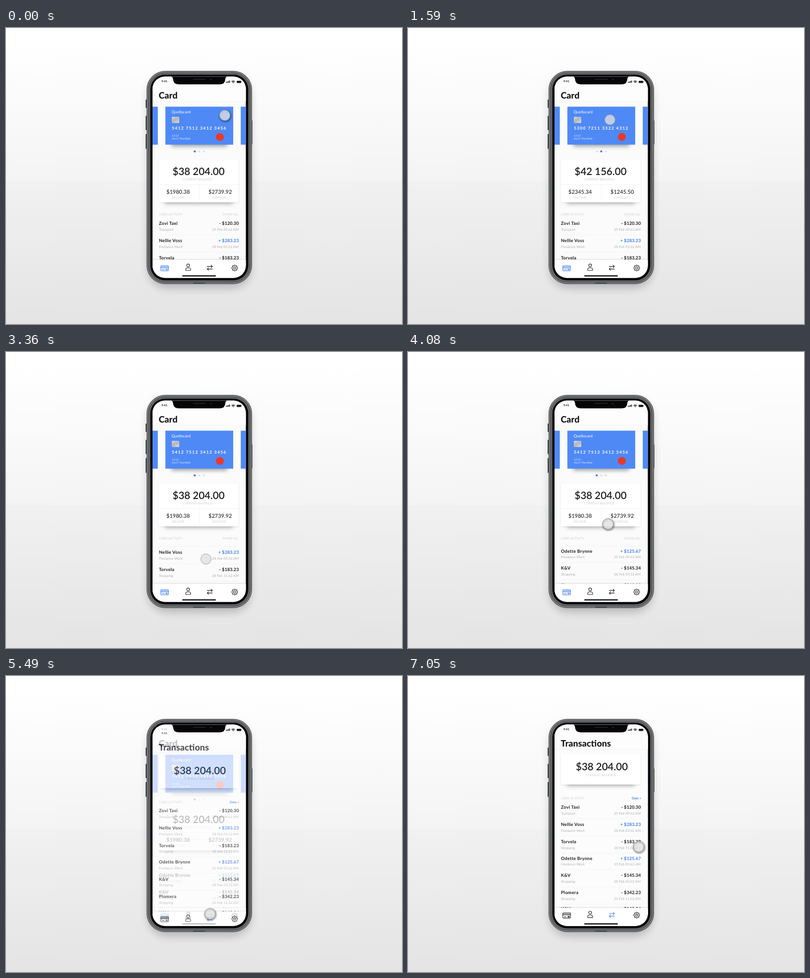
Write an HTML page that moves like this. It is 800 px wide and 600 px high and loops after 7080 ms.

```html
<!DOCTYPE html>
<html lang="en">
<head>
<meta charset="utf-8">
<title>Card app</title>
<style>
html, body { margin: 0; width: 100%; height: 100%; overflow: hidden; background: #fff; }
svg { display: block; width: 800px; height: 600px; font-family: Lato, "Open Sans", sans-serif; text-rendering: geometricPrecision; }
.title { font-size: 18px; font-weight: 800; fill: #151518; }
.sum { font-size: 20.5px; font-weight: 600; fill: #1c1c1f; }
.part { font-size: 11px; font-weight: 500; fill: #242428; }
.label { font-size: 6.5px; fill: #cfcfd2; }
.name { font-size: 9px; font-weight: 700; letter-spacing: .3px; fill: #1c1c1f; }
.amount { font-size: 9px; font-weight: 700; letter-spacing: .1px; fill: #1c1c1f; }
.plus { fill: #3f7cf0; }
.note { font-size: 7px; fill: #b1b1b5; }
.clock { font-size: 6px; font-weight: 700; fill: #222; }
.rule { stroke: #f3f3f5; stroke-width: 1; }
.icon { fill: none; stroke: #242428; stroke-width: 1.1; stroke-linecap: round; stroke-linejoin: round; }
.icon .on { stroke: #4c87f4; }
</style>
</head>
<body>
<svg id="stage" viewBox="0 0 800 600">
  <defs>
    <linearGradient id="wall" x2="0" y2="1"><stop offset=".08" stop-color="#fff"/><stop offset="1" stop-color="#f4f4f4"/></linearGradient>
    <linearGradient id="floor" x2="0" y2="1"><stop stop-color="#f1f1f1"/><stop offset="1" stop-color="#e4e4e4"/></linearGradient>
    <linearGradient id="chip" x2="1" y2="1"><stop stop-color="#d9d9d9"/><stop offset=".5" stop-color="#b9bbbd"/><stop offset="1" stop-color="#e6e6e6"/></linearGradient>
    <filter id="soft" x="-30%" y="-150%" width="160%" height="400%"><feGaussianBlur stdDeviation="4.5"/></filter>
    <filter id="wide" x="-30%" y="-30%" width="160%" height="160%"><feGaussianBlur stdDeviation="9"/></filter>
    <filter id="thin" x="-30%" y="-50%" width="160%" height="200%"><feGaussianBlur stdDeviation="1.6"/></filter>
    <clipPath id="screenClip"><rect x="296" y="98.5" width="188.5" height="408" rx="25"/></clipPath>
    <clipPath id="listClip"><rect x="296" y="389" width="189" height="81"/></clipPath>
    <clipPath id="pageClip"><rect x="296" y="255" width="189" height="215"/></clipPath>
  </defs>
  <rect width="800" height="310" fill="url(#wall)"/>
  <rect y="310" width="800" height="290" fill="url(#floor)"/>
  <rect x="287" y="97" width="207" height="430" rx="38" fill="#000" opacity=".22" filter="url(#wide)"/>
  <g fill="#4b4d4f">
    <rect x="282" y="145" width="4" height="17" rx="1"/>
    <rect x="282" y="178" width="4" height="29" rx="1"/>
    <rect x="282" y="215" width="4" height="30" rx="1"/>
    <rect x="495" y="187" width="2.800" height="49" rx="1"/>
  </g>
  <g id="frame">
    <rect x="284.500" y="87.500" width="212" height="431" rx="37" fill="#7a7c7e" stroke="#47494b"/>
    <rect x="288" y="91" width="205" height="424" rx="33.500" fill="#66686a" stroke="#3c3e40"/>
    <rect x="291.500" y="94.500" width="198" height="417" rx="30" fill="#060607"/>
  </g>
  <path d="M378 517.200h24" stroke="#47494b" stroke-width="1.500"/>
  <g clip-path="url(#screenClip)">
    <g id="cardPage"></g>
    <g id="listPage"></g>
    <path d="M332 97Q337 99 337.500 104Q338 114.200 349 114.200H432Q442.500 114.200 443 104Q443.500 99 448.500 97Z" fill="#060607"/>
    <g fill="#17171a">
      <path d="M444 111v-1.700h1.500v1.700zM446.300 111v-2.500h1.500v2.500zM448.600 111v-3.400h1.500v3.400zM450.900 111v-4.400h1.500v4.400z"/>
      <rect x="466" y="107" width="9" height="4.400" rx="1.200"/><rect x="475.600" y="108.300" width=".8" height="1.800"/>
    </g>
    <path d="M455.500 108.500q3.500-2.800 7 0M456.900 110q2.100-1.700 4.200 0" fill="none" stroke="#17171a" stroke-width="1.100"/>
    <circle cx="459" cy="111.200" r=".8" fill="#17171a"/>
  </g>
  <path d="M378 104h25" stroke="#3a3a3d" stroke-width="2.200" stroke-dasharray="1.300 1.300"/>
  <circle cx="414" cy="104.500" r="1.500" fill="#2c2d33"/>
  <g id="cursor">
    <circle id="cursorShade" cx="1" cy="1.500" r="10.800" fill="none" stroke="#000" stroke-width="2.500" filter="url(#thin)"/>
    <circle r="10.700" fill="#e0e0e0" fill-opacity=".78" stroke="#9a9c9f" stroke-width="1"/>
  </g>
</svg>
<script>
const LOOP = 7080;
const $ = id => document.getElementById(id);

const text = (x, y, cls, str, extra = '') => `<text x="${x}" y="${y}" class="${cls}" ${extra}>${str}</text>`;
const END = 'text-anchor="end"';
const MID = 'text-anchor="middle"';
const rule = (x1, y1, x2, y2) => `<path class="rule" d="M${x1} ${y1}L${x2} ${y2}"/>`;

const rows = [
  ['Zovi Taxi', 'Transport', '- $120.30', '29 Feb 09:62 AM'],
  ['Nellie Voss', 'Freelance Work', '+ $283.23', '28 Feb 03:32 AM'],
  ['Torvela', 'Shopping', '- $183.23', '28 Feb 11:32 AM'],
  ['Odette Brynne', 'Freelance Work', '+ $125.67', '25 Feb 09:62 AM'],
  ['K&amp;V', 'Shopping', '- $145.34', '28 Feb 03:32 AM'],
  ['Plomera', 'Shopping', '- $342.23', '24 Feb 11:32 AM'],
  ['K&amp;V', 'Shopping', '- $145.34', '28 Feb 03:32 AM']
];
const rowTops = [0, 35, 70.3, 103.8, 138.3, 173.5, 206.3];

const list = top => rows.map(([name, kind, amount, date], i) => {
  const y = top + rowTops[i];
  const tone = amount[0] === '+' ? 'amount plus' : 'amount';
  return text(309, y + 3.2, 'name', name) + text(470.5, y + 3.2, tone, amount, END) +
    text(309, y + 15, 'note', kind) + text(470, y + 15, 'note', date, END) +
    rule(309, y + 23.5, 470, y + 23.5);
}).join('');

const panel = (y, h) =>
  `<rect x="321" y="${y + h - 10}" width="137" height="13" fill="#000" opacity=".28" filter="url(#soft)"/>
   <rect x="309" y="${y + 1}" width="161" height="${h}" fill="#000" opacity=".1" filter="url(#thin)"/>
   <rect x="309" y="${y}" width="161" height="${h}" fill="#fff"/>`;

const bankCard = (x, digits) => `<g transform="translate(${x})">
  <rect x="334" y="226" width="113" height="14" fill="#000" opacity=".36" filter="url(#soft)"/>
  <rect x="322" y="159.500" width="137" height="77" fill="#4f89f6"/>
  <g fill="#fff">
    ${text(334.5, 173, '', 'Quellocard', 'font-size="8"')}
    ${text(335, 206, '', digits, 'font-size="8.5" font-weight="700" letter-spacing="1.35"')}
    ${text(335, 219.5, '', '12/23', 'font-size="5" opacity=".85"')}
    ${text(335, 226, '', 'Ana P. Thornfield', 'font-size="5" opacity=".9"')}
  </g>
  <rect x="335" y="180" width="15" height="12.500" rx="1.500" fill="url(#chip)"/>
  <path d="M335 184.500h5v4h-5M350 184.500h-5v4h5M342.500 180v4" fill="none" stroke="#96989a" stroke-width=".5"/>
  <circle cx="432" cy="220.800" r="8" fill="#e8392b"/>
</g>`;

const gear = () => {
  let d = '';
  for (let i = 0; i < 32; i++) {
    const a = (i - .5) * Math.PI / 16, r = i % 4 < 2 ? 6 : 4.8;
    d += `${i ? 'L' : 'M'}${(462 + r * Math.cos(a)).toFixed(2)} ${(486.5 + r * Math.sin(a)).toFixed(2)}`;
  }
  return `<path d="${d}Z"/><circle cx="462" cy="486.500" r="2.200"/>`;
};

const tabs = (active, shift) => {
  const on = name => name === active ? 'class="on"' : '';
  return `<rect x="296" y="469" width="189" height="5" fill="#000" opacity=".13" filter="url(#thin)"/>
    <rect x="296" y="470" width="189" height="60" fill="#fff"/>
    <g class="icon" transform="translate(0 ${shift})">
      <g ${on('card')}>
        <rect x="312.700" y="481.700" width="15.600" height="10.600" rx="1.300" fill="${active === 'card' ? '#ecf2ff' : 'none'}"/>
        <path d="M313 484h15M313 486h15M315.500 489.700h4"/><path d="M323 488.800h3v1.500h-3z"/>
      </g>
      <circle cx="368" cy="481.300" r="2.900"/>
      <path d="M363 491.300V489.500Q363 486.200 366.500 486.200H369.500Q373 486.200 373 489.500V491.300Z"/>
      <path ${on('swap')} d="M406.500 483.400H417M414.300 480.700L417 483.400L414.300 486.100M417 488.600H406.500M409.200 485.900L406.500 488.600L409.200 491.300"/>
      ${gear()}
    </g>
    <rect x="356" y="501.200" width="68" height="2.500" rx="1.250" fill="#111"/>`;
};

const header = title => `
  <rect x="296" y="90" width="189" height="58" fill="#fdfdfe"/>${rule(296, 148.5, 485, 148.5)}
  ${text(314, 110.2, 'clock', '9:41')}${text(308.5, 143.2, 'title', title)}`;

const figures = (id, sum, income, expense) => `<g id="${id}">
  ${text(336.5, 297.5, 'sum', sum)}${text(324, 335.7, 'part', income)}${text(409, 335.7, 'part', expense)}</g>`;

const NUMBER_A = '5412 7512 3412 3456', NUMBER_B = '5300 7211 3322 4312';

$('cardPage').innerHTML = `
  <rect x="296" y="90" width="189" height="420" fill="#fbfbfc"/>${header('Card')}
  <g id="cards">${[-1, 0, 1, 2].map(i => bankCard(i * 152.3, i % 2 ? NUMBER_B : NUMBER_A)).join('')}</g>
  ${[0, 1, 2].map(i => `<circle cx="${381.3 + i * 9.1}" cy="250.200" r="2.100" fill="#e0e1e4"/>`).join('')}
  <circle id="dotA" cx="381.300" cy="250.200" r="2.100" fill="#3f7cf0"/>
  <circle id="dotB" cx="390.400" cy="250.200" r="2.100" fill="#3f7cf0"/>
  ${panel(267.5, 86)}${rule(309, 317.5, 470, 317.5)}${rule(390.5, 318, 390.5, 353)}
  ${figures('sumsA', '$38 204.00', '$1980.38', '$2739.92')}
  ${figures('sumsB', '$42 156.00', '$2345.34', '$1245.50')}
  ${text(386.5, 308.8, 'label', 'CURRENT BALANCE', MID)}
  ${text(347.5, 346.2, 'label', 'INCOME', MID)}${text(431, 346.2, 'label', 'EXPENSE', MID)}
  ${text(309, 380.2, 'label', 'CARD ACTIVITY')}${text(470, 380.2, 'label', 'SHOW ALL', END)}
  <g clip-path="url(#listClip)"><g id="activity">${list(395.5)}</g></g>
  ${tabs('card', 0)}`;

$('listPage').innerHTML = `
  <rect x="296" y="70" width="189" height="460" fill="#fcfcfd"/>${header('Transactions')}
  ${panel(158, 62)}${text(339, 191, 'sum', '$38 204.00')}${text(390, 202.8, 'label', 'CURRENT BALANCE', MID)}
  ${text(309, 250.2, 'label', 'CARD ACTIVITY')}
  ${text(466, 250.2, 'label', 'Date', END + ' font-weight="700" style="fill:#3f7cf0"')}
  <path d="M467.700 247.300h3l-1.500 2z" fill="#3f7cf0"/>
  <g clip-path="url(#pageClip)">${list(265.5)}</g>
  ${tabs('swap', -1.7)}`;

const clamp = v => Math.min(1, Math.max(0, v));
const inOut = p => p < .5 ? 4 * p ** 3 : 1 - 4 * (1 - p) ** 3;

// Eased value between [time, value] stops.
function track(t, stops) {
  let [t0, v0] = stops[0];
  for (const [t1, v1] of stops) {
    if (t < t1) return v0 + (v1 - v0) * inOut(clamp((t - t0) / (t1 - t0)));
    [t0, v0] = [t1, v1];
  }
  return v0;
}

const cursorX = [[0, 442], [720, 444], [800, 444], [1400, 408], [1600, 408], [1760, 372], [2160, 409], [2340, 409], [2950, 404], [4200, 404], [5200, 412], [6510, 412], [7050, 466]];
const cursorY = [[0, 177], [720, 185], [1400, 186], [1600, 186], [2160, 185], [2340, 185], [2950, 444.5], [3060, 444.5], [3810, 348.5], [4200, 348.5], [5200, 482], [6510, 482], [7050, 346]];
const press = [[720, 0], [800, 1], [2350, 1], [2480, 0], [2960, 0], [3060, 1], [3810, 1], [3920, 0], [5180, 0], [5260, 1], [5360, 0]];
const swipe = [[800, 0], [1400, 1], [1760, 1], [2160, 0]];
const scroll = [[3060, 0], [3810, -96]];

function draw(t) {
  const s = track(t, swipe), swap = clamp(s * 3 - 1), p = track(t, press);
  $('cards').setAttribute('transform', `translate(${-152.3 * s})`);
  for (const id of ['sumsA', 'dotA']) $(id).setAttribute('opacity', 1 - swap);
  for (const id of ['sumsB', 'dotB']) $(id).setAttribute('opacity', swap);
  $('activity').setAttribute('transform', `translate(0 ${track(t, scroll)})`);

  const rise = 24 * (1 - clamp((t - 5300) / 600)) ** 3;
  $('listPage').setAttribute('transform', `translate(0 ${rise})`);
  $('listPage').setAttribute('opacity', clamp((t - 5300) / 260));

  $('cursor').setAttribute('transform', `translate(${track(t, cursorX)} ${track(t, cursorY)}) scale(${1 - .03 * p})`);
  $('cursorShade').setAttribute('opacity', .5 * (1 - p));
}

const start = performance.now();
function tick() {
  draw((performance.now() - start) % LOOP);
  requestAnimationFrame(tick);
}
draw(0);
requestAnimationFrame(tick);
</script>
</body>
</html>
```
